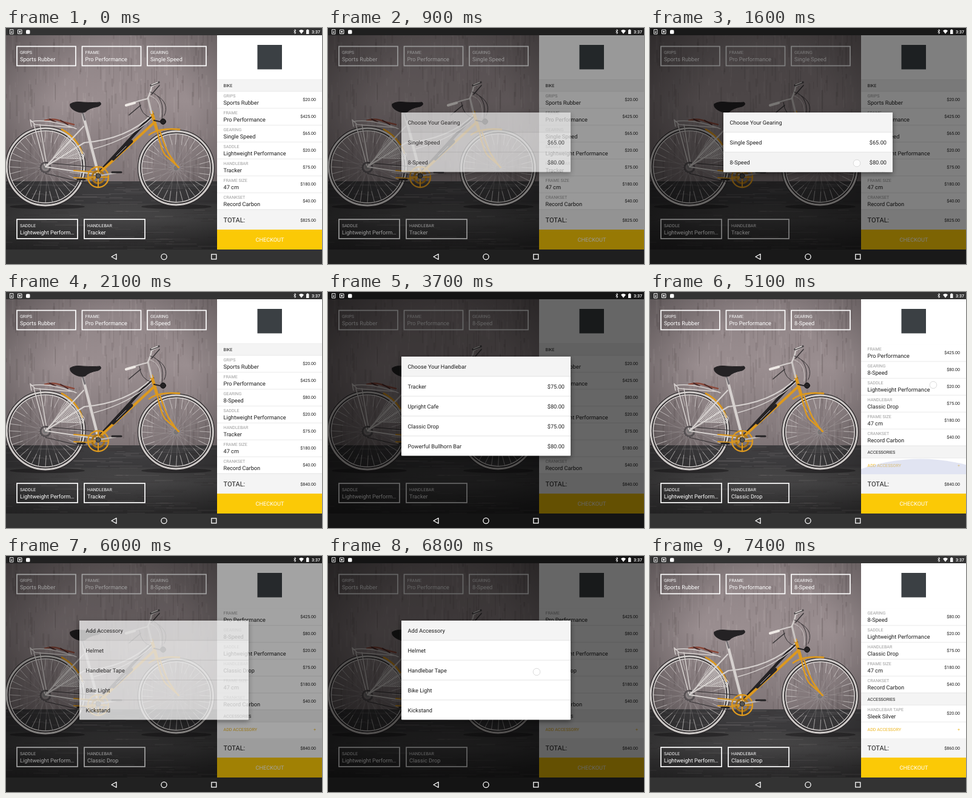
Recreate the animation shown at these times as an HTML page. Size 521x391 px, loop 8000 ms.

```html
<!DOCTYPE html>
<html lang="en">
<head>
<meta charset="utf-8">
<title>Bike configurator</title>
<style>
html, body { margin: 0; width: 100%; height: 100%; overflow: hidden; background: #333; }
svg { display: block; width: 521px; height: 391px; }
text { font-family: Roboto, Arial, sans-serif; font-size: 9.2px; fill: #1c1c1c; text-rendering: geometricPrecision; }
.small { font-size: 7.12px; }
.label { font-size: 7.12px; fill: #9b9b9b; }
.end { text-anchor: end; }
.mid { text-anchor: middle; }
.white, .white text { fill: #fff; }
.gold { font-size: 7.12px; fill: #edb51c; }
.line { fill: none; stroke-linecap: round; stroke-linejoin: round; }
</style>
</head>
<body>
<svg id="stage" viewBox="0 0 521 391">
  <defs>
    <linearGradient id="wall" x2="0" y2="1">
      <stop stop-color="#8d8284"/><stop offset=".45" stop-color="#9a8e90"/><stop offset="1" stop-color="#7f7577"/>
    </linearGradient>
    <linearGradient id="floor" x2="0" y2="1">
      <stop stop-color="#464546"/><stop offset=".35" stop-color="#4f4e4f"/><stop offset="1" stop-color="#353435"/>
    </linearGradient>
    <linearGradient id="fadeEdge" x2="0" y2="1">
      <stop offset=".3" stop-color="#fff"/><stop offset="1" stop-color="#fff" stop-opacity="0"/>
    </linearGradient>
    <radialGradient id="edge" cx=".55" cy=".4" r=".72">
      <stop offset=".45" stop-opacity="0"/><stop offset="1" stop-opacity=".36"/>
    </radialGradient>
    <pattern id="mesh" width="2.4" height="2.4" patternUnits="userSpaceOnUse" patternTransform="rotate(40)">
      <path d="M0 0H2.400M0 0V2.400" stroke="#dedad8" stroke-width="1.1"/>
    </pattern>
    <clipPath id="photoClip"><rect y="12" width="348" height="355"/></clipPath>
    <clipPath id="listClip"><rect x="348" y="85" width="173" height="217"/></clipPath>
    <filter id="shadow" x="-10%" y="-15%" width="120%" height="135%">
      <feDropShadow dx="0" dy="3" stdDeviation="4" flood-opacity=".45"/>
    </filter>
  </defs>

  <rect width="521" height="391" fill="#333"/>
  <g clip-path="url(#photoClip)">
    <rect y="12" width="348" height="243" fill="url(#wall)"/>
    <g id="streaks"></g>
    <rect y="254" width="348" height="38" fill="#3e3d3f"/>
    <rect y="291" width="348" height="76" fill="url(#floor)"/>
    <g id="cracks"></g>
    <ellipse cx="68" cy="296" rx="62" ry="4" fill="#201f21" opacity=".6"/>
    <ellipse cx="281" cy="296" rx="58" ry="4" fill="#201f21" opacity=".6"/>
    <rect y="12" width="348" height="355" fill="url(#edge)"/>
    <g id="wheels" class="line"></g>
    <g id="bike" class="line"></g>
  </g>
  <g id="boxes"></g>

  <rect x="348" y="12" width="173" height="355" fill="#fff"/>
  <rect x="414.500" y="28" width="40.500" height="40.500" fill="#3b4044"/>
  <g clip-path="url(#listClip)">
    <g id="list"></g>
    <rect id="listFade" x="348" y="85" width="173" height="6" fill="url(#fadeEdge)"/>
    <circle id="glow" cx="446" cy="570.500" r="294" fill="#bcc4e2" opacity="0"/>
  </g>
  <rect x="348" y="302" width="173" height="32" fill="#f4f4f4"/>
  <text x="358.5" y="322.200" style="font-size:11px">TOTAL:</text>
  <text id="total" class="small end" x="511" y="320.800"></text>
  <rect x="348" y="334" width="173" height="33" fill="#fbc906"/>
  <text class="white mid" x="435" y="354.100">CHECKOUT</text>

  <rect id="dim" width="521" height="391" opacity="0"/>
  <g id="dialogs"></g>
  <circle id="tap" r="5.800" fill="#fff" fill-opacity=".75" stroke="#d2d2d2" stroke-width=".8"/>

  <g id="system" fill="none" stroke="#fff">
    <path d="M182 374.500V383.500L174 379Z" stroke-width="1.300" stroke-linejoin="round"/>
    <circle cx="260.500" cy="379" r="4.600" stroke-width="1.300"/>
    <rect x="338.800" y="375" width="8" height="8" stroke-width="1.300"/>
    <path d="M6.500 2.500H12V10H6.500ZM9.200 4.500V8M8 7L9.200 8.200L10.400 7" stroke-width=".9"/>
    <path d="M19.500 3H26V9.500H19.500Z" stroke-width="1"/>
    <circle cx="22.700" cy="6.200" r="1.500" fill="#fff" stroke="none"/>
    <rect x="33" y="3.300" width="6.500" height="6.500" rx="1.500" fill="#fff" stroke="none"/>
    <path d="M474.500 4L478 8L476.200 9.700V2.300L478 4L474.500 8" stroke-width=".8"/>
    <path d="M483 4.500Q487 1.200 491 4.500L487 9.800Z" fill="#fff" stroke="none"/>
    <path d="M495 3.300H496.300V2.300H498.300V3.300H499.500V10H495Z" fill="#fff" stroke="none"/>
    <text class="white small end" x="518" y="8.800" stroke="none" font-weight="500">3:37</text>
  </g>
</svg>

<script>
const LOOP = 8000, STEP = 100;
const $ = id => document.getElementById(id);
const text = (x, y, s, cls = '') => `<text x="${x}" y="${y}" class="${cls}">${s}</text>`;
const rect = (x, y, w, h, fill, extra = '') =>
  `<rect x="${x}" y="${y}" width="${w}" height="${h}" fill="${fill}" ${extra}/>`;
const path = (d, color, w, extra = '') =>
  `<path d="${d}" stroke="${color}" stroke-width="${w}" ${extra}/>`;

// Wall and floor texture
let seed = 11;
const rand = () => (seed = seed * 16807 % 2147483647) / 2147483647;
const shade = () => rand() < .5 ? '#d8cccd' : '#2a2024';
const many = (n, fn) => Array.from({ length: n }, (_, i) => fn(i)).join('');
$('streaks').innerHTML = many(420, () =>
  rect(rand() * 348, rand() * 245, .7 + rand() * 2.5, 5 + rand() * 38, shade(), 'opacity=".1"'));
$('cracks').innerHTML = many(150, () =>
  rect(rand() * 360 - 20, 256 + rand() * 110, 8 + rand() * 50, .6 + rand() * 1.4, shade(), 'opacity=".1"'));

function wheel(cx, cy, r) {
  const ring = (rad, color, w) => `<circle cx="${cx}" cy="${cy}" r="${rad}" stroke="${color}" stroke-width="${w}"/>`;
  const spokes = (from, skew) => many(32, i => {
    const a = i * Math.PI / 16, b = a + (i % 2 ? skew : -skew);
    return `M${cx + from * Math.cos(b)} ${cy + from * Math.sin(b)}L${cx + (r - 7) * Math.cos(a)} ${cy + (r - 7) * Math.sin(a)}`;
  });
  return path(spokes(4, .9), '#bdb7b6', .5, 'opacity=".5"') + path(spokes(r * .62, .03), '#e6e2e0', .7, 'opacity=".75"') +
    ring(r - .5, '#2c292b', 1.4) + ring(r - 2.7, '#cdc9c7', 3.2) + ring(r - 5.1, '#302d2f', 1.8) +
    ring(r - 6.8, '#d8d4d2', 1.4) + ring(3, '#777', 2);
}
$('wheels').innerHTML = wheel(65, 230, 66.5) + wheel(280.5, 232, 63.5);

const GOLD = '#dd991e', PALE = '#d6d1cf', DARK = '#242224';
$('bike').innerHTML = [
  // rear rack, guard and fender
  path('M64 153Q80 149 92 155L112 160', '#8b4a3c', 2.6),
  path('M72 151L82 156M90 153L102 160', '#4b2a28', 2),
  path('M40 152L48 160L112 165M42 155Q70 150 116 167M46 160L64 228M56 160L67 226M40 152L42 163', PALE, 1.5),
  path('M92 168Q116 181 126 207', GOLD, 3),
  path('M104 178L129 208L128 217L78 215Z', PALE, 1, 'fill="url(#mesh)"'),
  // chain and stays
  `<circle cx="65" cy="231" r="8" stroke="#4a4648" stroke-width="3" opacity=".8"/>`,
  path('M65 241L150 261M65 223L150 231', '#333032', 1.1),
  path('M65 230L151 243M65 230L128 163', PALE, 2.2),
  path('M112 236L150 239L146 250L112 248', GOLD, 2),
  // frame tubes
  path('M242 143L151 242', DARK, 4.5),
  path('M244 157L153 241', GOLD, 4.2),
  path('M207 188L177 217', '#252326', 5),
  path('M198 196L182 212', '#c4beb8', 1),
  path('M240 144Q200 184 129 190L66 229', PALE, 2.2),
  path('M241 149Q205 184 145 200', PALE, 1.3),
  path('M127 143L152 241', PALE, 4.5),
  path('M126 139L130 152', '#777276', 3),
  // fork and front fender
  path('M240 139L249 170', GOLD, 5),
  path('M249 168Q256 205 264 212T285 231M254 172Q263 200 270 211T284 231', GOLD, 2.4),
  path('M236 177Q252 165 286 168', GOLD, 2.8),
  // crank
  `<circle cx="152" cy="247" r="17" stroke="${GOLD}" stroke-width="2.4"/>`,
  `<circle cx="152" cy="247" r="10" stroke="#a87318" stroke-width="3"/>`,
  path('M152 230V264M135 247H169', GOLD, 2),
  path('M152 245L181 240', '#bcb6b3', 2.5),
  path('M175 239H190M118 251H130', DARK, 3.2),
  `<circle cx="152" cy="245" r="4" fill="#555" stroke="#222"/>`,
  // saddle
  path('M106 126Q112 121 127 123Q145 124 155 123Q159 127 152 130Q136 133 131 139Q122 142 112 136Q104 131 106 126Z',
    DARK, 1, `fill="${DARK}"`),
  // handlebar, cables, lamp
  path('M240 141L234 116', '#c9c4c2', 3.2),
  path('M234 117Q222 119 199 128M234 116Q239 105 240 97L251 91', PALE, 2.2),
  path('M198 128L212 124', '#eee9e5', 4.2),
  path('M239 95L252 90', '#4a4648', 3.4),
  path('M240 94L250 90', '#e0dbd8', 1.5),
  path('M203 144L222 128M240 110L253 95', '#393638', 1.6),
  path('M220 123Q222 145 240 149M238 106Q263 113 257 151M249 112Q270 125 261 145', '#353234', 1),
  path('M236 112Q258 118 254 148', PALE, .8),
  `<circle cx="259" cy="155" r="4.500" fill="${DARK}" stroke="#111"/>`,
  path('M244 153L257 156', DARK, 2)
].join('');

// Option boxes over the photo
const box = (x, y, w, label, value, id = '') =>
  rect(x, y, w, 32, 'none', 'stroke="#fff" stroke-width="1.7"') +
  `<g class="white">${text(x + 5, y + 12.800, label, 'small')}<text id="${id}" x="${x + 5}" y="${y + 24.800}">${value}</text></g>`;
$('boxes').innerHTML =
  box(18, 30.5, 97, 'GRIPS', 'Sports Rubber') +
  box(125.5, 30.5, 97, 'FRAME', 'Pro Performance') +
  box(233, 30.5, 97, 'GEARING', '', 'gearBox') +
  box(18, 317, 100, 'SADDLE', 'Lightweight Perform…') +
  box(129, 317, 100, 'HANDLEBAR', '', 'barBox');

// Order list
const rule = y => rect(348, y - .4, 173, .8, '#e3e3e3');
const heading = (y, s) => rect(348, y, 173, 20, '#f4f4f4') + rule(y) + rule(y + 20) + text(358.5, y + 13, s, 'small');
const item = (y, [label, value, price]) =>
  text(358.5, y + 9.900, label, 'label') + text(358.5, y + 22.400, value) + text(511, y + 16.300, price, 'small end') + rule(y + 28);

function listMarkup(gear, bar, tape) {
  const parts = [
    ['GRIPS', 'Sports Rubber', '$20.00'],
    ['FRAME', 'Pro Performance', '$425.00'],
    ['GEARING', gear, gear === '8-Speed' ? '$80.00' : '$65.00'],
    ['SADDLE', 'Lightweight Performance', '$20.00'],
    ['HANDLEBAR', bar, '$75.00'],
    ['FRAME SIZE', '47 cm', '$180.00'],
    ['CRANKSET', 'Record Carbon', '$40.00']
  ];
  let y = 301;
  let out = heading(85, 'BIKE') + parts.map((p, i) => item(105 + 28 * i, p)).join('') + heading(y, 'ACCESSORIES');
  y += 20;
  if (tape) {
    out += item(y, ['HANDLEBAR TAPE', 'Sleek Silver', '$20.00']);
    y += 28;
  }
  return out + text(358.5, y + 15.300, 'ADD ACCESSORY', 'gold') + text(511, y + 15.300, '+', 'gold end');
}

// Dialogs
function dialog(top, title, rows) {
  const h = 32.85;
  return `<g opacity="0"><g filter="url(#shadow)">${rect(121, top, 279, h * (rows.length + 1), '#fff', 'rx="1"')}</g>` +
    rect(121, top, 279, h, '#f4f4f4') + text(131.5, top + 20.100, title) +
    rows.map(([name, price = '', pressed], i) => {
      const y = top + h * (i + 1);
      return (pressed ? rect(121, y, 279, h, '#f3f3f3', 'class="pressed"') : '') + rect(121, y - .4, 279, .8, '#dedede') +
        text(131.5, y + 20.100, name) + text(390, y + 20.100, price, 'end');
    }).join('') + '</g>';
}
$('dialogs').innerHTML =
  dialog(140, 'Choose Your Gearing', [['Single Speed', '$65.00'], ['8-Speed', '$80.00', true]]) +
  dialog(107, 'Choose Your Handlebar',
    [['Tracker', '$75.00'], ['Upright Cafe', '$80.00'], ['Classic Drop', '$75.00', true], ['Powerful Bullhorn Bar', '$80.00']]) +
  dialog(107, 'Add Accessory', [['Helmet'], ['Handlebar Tape'], ['Bike Light'], ['Kickstand']]);
const dialogs = [...$('dialogs').children];
const pressed = [...document.querySelectorAll('.pressed')];

// Motion tables: [time, value]
const FADES = [
  [[700, 0], [1000, 1], [1600, 1], [1900, 0]],
  [[3300, 0], [3600, 1], [4100, 1], [4400, 0]],
  [[5700, 0], [6100, 1], [6800, 1], [7100, 0]]
];
const DIM = [[700, 0], [1000, .6], [1500, .6], [1600, .5], [2000, 0], [3300, 0], [3700, .6], [4100, .6], [4500, 0],
  [5700, 0], [6200, .6], [6800, .6], [7200, 0]];
const SCROLL = [[4800, 0], [4900, 14], [5000, 36], [5100, 46], [7100, 46], [7400, 74]];
const GLOW = [[5000, 0], [5100, .45], [5200, .4], [5600, 0]];
const DRAG = [[4800, 214], [5100, 154]];
// Taps: start, end, x, y
const TAPS = [[700, 800, 281, 47], [1600, 1700, 341, 224], [3300, 3400, 180, 333], [4100, 4200, 341, 224],
  [4800, 5200, 467, 0], [5700, 5800, 440, 288], [6800, 6900, 344, 192]];

function at(table, t) {
  const i = table.findIndex(k => k[0] > t);
  if (i === 0) return table[0][1];
  if (i < 0) return table[table.length - 1][1];
  const [t0, a] = table[i - 1], [t1, b] = table[i];
  return a + (b - a) * (t - t0) / (t1 - t0);
}

let shown = '';
function draw(t) {
  const gear = t >= 1800 ? '8-Speed' : 'Single Speed';
  const bar = t >= 4300 ? 'Classic Drop' : 'Tracker';
  const tape = t >= 7000;
  const key = gear + bar + tape;
  if (key !== shown) {
    shown = key;
    $('list').innerHTML = listMarkup(gear, bar, tape);
    $('gearBox').textContent = gear;
    $('barBox').textContent = bar;
    $('total').textContent = tape ? '$860.00' : t >= 1800 ? '$840.00' : '$825.00';
  }
  const scroll = at(SCROLL, t);
  $('list').setAttribute('transform', `translate(0 ${-scroll})`);
  $('listFade').setAttribute('opacity', scroll > 0 ? 1 : 0);
  $('glow').setAttribute('opacity', at(GLOW, t));
  $('dim').setAttribute('opacity', at(DIM, t));
  dialogs.forEach((d, i) => d.setAttribute('opacity', at(FADES[i], t)));
  pressed.forEach((p, i) => p.setAttribute('opacity', t >= [1600, 4100][i] ? 1 : 0));

  const tap = TAPS.find(([from, to]) => t >= from && t < to);
  $('tap').setAttribute('opacity', tap ? 1 : 0);
  if (tap) {
    $('tap').setAttribute('cx', tap[2]);
    $('tap').setAttribute('cy', tap[3] || at(DRAG, t));
  }
}

const start = performance.now();
function tick() {
  const t = (performance.now() - start) % LOOP;
  draw(Math.floor(t / STEP) * STEP);
  requestAnimationFrame(tick);
}
tick();
</script>
</body>
</html>
```
